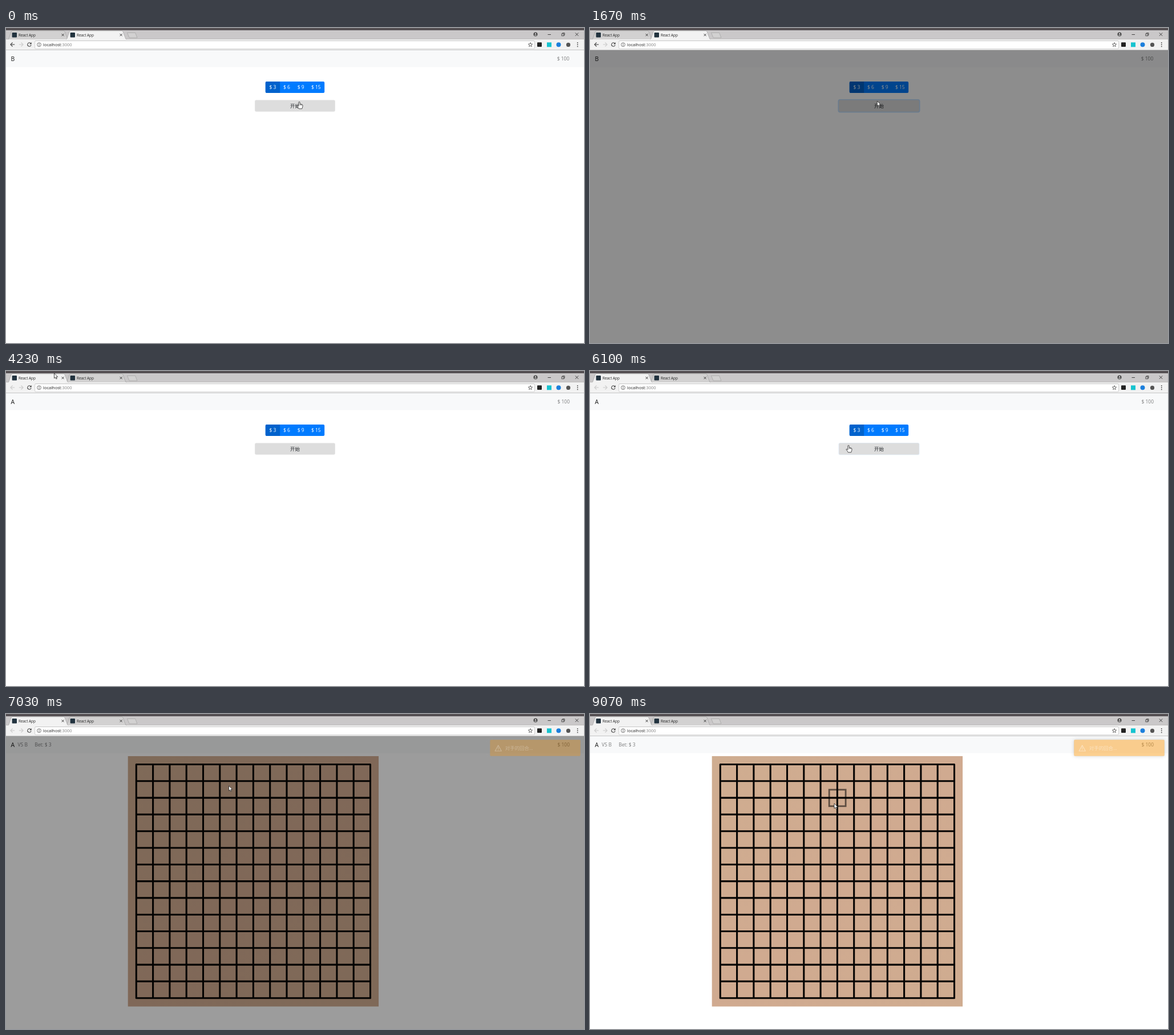
Write an HTML page with a canvas that moves like this. It is 1013 px wide and 553 px high and loops after 9.11 s.

```html
<!DOCTYPE html>
<html lang="zh">
<head>
<meta charset="utf-8">
<title>React App</title>
<style>
html, body { margin: 0; width: 100%; height: 100%; overflow: hidden; background: #fff; }
canvas { display: block; width: 1013px; height: 553px; }
</style>
</head>
<body>
<canvas id="stage"></canvas>
<script>
const W = 1013, H = 553, LOOP = 9110, REM = 8.44;
const FONT = '"Open Sans", "Noto Sans", "Noto Sans CJK SC", "Noto Sans CJK", sans-serif';
const canvas = document.getElementById('stage');
const ctx = canvas.getContext('2d');
const dpr = window.devicePixelRatio || 1;
canvas.width = Math.round(W * dpr);
canvas.height = Math.round(H * dpr);

// Moments in ms
const CLICK_B = 1465, SWITCH_TAB = 4130, CLICK_A = 6065, MATCHED = 6690;
const BACKDROP_OUT = 6997, TOAST_IN = 6904, TOAST_OUT = 8700, HOVER_FROM = 7730;

// Pointer hotspot: time, x, y
const POINTER = [
  [0, 514, 129.5], [280, 510, 123], [570, 509, 128], [1500, 509, 128], [1570, 505.5, 128.5],
  [2330, 461, 125], [2430, 458, 123], [3330, 265, 76], [4000, 88, 7], [4230, 84.5, 4],
  [4600, 84.5, 4], [4900, 285, 120], [5100, 285, 120], [5530, 453, 130.5], [6100, 453, 130.5],
  [7000, 390.5, 126], [7700, 390.5, 126], [8630, 428, 157]
];

const unit = (t, start, length) => Math.min(1, Math.max(0, (t - start) / length));
const smooth = p => p * p * (3 - 2 * p);
const swing = p => 0.5 - Math.cos(p * Math.PI) / 2;
const easeOut = p => 1 - (1 - p) ** 2;

function pointerAt(t) {
  const i = POINTER.findIndex(k => k[0] > t);
  if (i < 0) return POINTER[POINTER.length - 1].slice(1);
  const [t0, x0, y0] = POINTER[i - 1], [t1, x1, y1] = POINTER[i];
  const p = smooth((t - t0) / (t1 - t0));
  return [x0 + (x1 - x0) * p, y0 + (y1 - y0) * p];
}

function rect(x, y, w, h, fill, r = 0) {
  ctx.fillStyle = fill;
  ctx.beginPath();
  ctx.roundRect(x, y, w, h, r);
  ctx.fill();
}

function path(points, { fill, stroke, width = 1, close = false }) {
  ctx.beginPath();
  points.forEach(([x, y]) => ctx.lineTo(x, y));
  if (close) ctx.closePath();
  if (fill) { ctx.fillStyle = fill; ctx.fill(); }
  if (stroke) { ctx.strokeStyle = stroke; ctx.lineWidth = width; ctx.stroke(); }
}

function arc(x, y, r, { fill, stroke, width = 0.8, from = 0, to = Math.PI * 2 }) {
  ctx.beginPath();
  ctx.arc(x, y, r, from, to);
  if (fill) { ctx.fillStyle = fill; ctx.fill(); }
  if (stroke) { ctx.strokeStyle = stroke; ctx.lineWidth = width; ctx.stroke(); }
}

function text(s, x, cy, size, color, align = 'left', weight = 400) {
  ctx.font = `${weight} ${size}px ${FONT}`;
  ctx.textAlign = align;
  ctx.fillStyle = color;
  ctx.fillText(s, x, cy + size * 0.36);
}

function cross(x, y, r, color, width) {
  path([[x - r, y - r], [x + r, y + r]], { stroke: color, width });
  path([[x - r, y + r], [x + r, y - r]], { stroke: color, width });
}

function tab(x, active) {
  path([[x, 20], [x + 1.5, 19], [x + 6, 6], [x + 7.5, 5], [x + 98, 5], [x + 99.5, 6], [x + 104.5, 19], [x + 106, 20]],
    { fill: active ? '#f2f2f2' : '#d2d1d1', stroke: '#9b9a9a', width: 0.6 });
  rect(x + 7.3, 8, 8.4, 8.4, '#22333f', 1);
  text('React App', x + 18.7, 12.2, 6.4, '#222');
  cross(x + 96.3, 12.2, 2, '#333', 1);
}

function backArrow(x, dir, color) {
  path([[x + 3.7 * dir, 29], [x - 3.5 * dir, 29]], { stroke: color, width: 1.1 });
  path([[x, 25.5], [x - 3.6 * dir, 29], [x, 32.5]], { stroke: color, width: 1.1 });
}

function browser(onB) {
  rect(0, 0, W, 4, '#555053');
  rect(0, 4, W, 16, '#cac8c9');
  rect(0, 19.7, W, 19, '#f2f2f2');
  rect(0, 19.5, W, 0.5, '#a9a8a8');
  rect(0, 38.2, W, 0.8, '#b6b6b6');
  path([[212.5, 8.3], [226.5, 8.3], [230, 17], [216, 17]], { fill: '#d2d1d1', stroke: '#9b9a9a', width: 0.6, close: true });
  if (onB) { tab(3.3, false); tab(105.3, true); }
  else { tab(105.3, false); tab(3.3, true); }

  // Window controls
  arc(928, 11, 3.5, { fill: '#444' });
  arc(928, 10, 1.3, { fill: '#cac8c9' });
  rect(926, 12, 4, 1.2, '#cac8c9', 0.6);
  rect(949.5, 11, 5.5, 0.9, '#333');
  ctx.strokeStyle = '#333';
  ctx.lineWidth = 0.8;
  ctx.strokeRect(974, 10, 3.8, 3.8);
  path([[975.4, 10], [975.4, 8.7], [979, 8.7], [979, 12.4], [977.8, 12.4]], { stroke: '#333', width: 0.8 });
  cross(1000.5, 11.2, 2.7, '#333', 0.9);

  // Toolbar
  backArrow(11.5, 1, onB ? '#444' : '#ccc');
  backArrow(26.5, -1, '#ccc');
  arc(41, 29, 3.2, { stroke: '#444', width: 1.1, from: 0.3, to: 5.4 });
  path([[44.7, 25], [44.7, 28.6], [41.2, 28.6]], { fill: '#444' });
  rect(50.5, 22.3, 876, 14.2, '#b9b9b9', 1.5);
  rect(51.1, 22.9, 874.8, 13, '#fff', 1);
  arc(58, 29.2, 3.4, { stroke: '#555' });
  rect(57.6, 28.6, 0.9, 2.6, '#555');
  rect(57.6, 27, 0.9, 0.9, '#555');
  text('localhost', 65, 29, 7.5, '#222');
  const hostWidth = ctx.measureText('localhost').width;
  text(':3000', 65 + hostWidth, 29, 7.5, '#808080');
  const star = Array.from({ length: 10 }, (_, i) => {
    const a = i * Math.PI / 5 - Math.PI / 2, r = i % 2 ? 1.7 : 3.9;
    return [919 + r * Math.cos(a), 29.4 + r * Math.sin(a)];
  });
  path(star, { stroke: '#444', width: 0.8, close: true });
  rect(931, 25.3, 8, 7.8, '#222', 1);
  rect(948, 25.3, 8, 8, '#16c3cf');
  arc(968.5, 29.2, 4, { fill: '#1c7fdc' });
  arc(985.5, 29.4, 3.6, { fill: '#555' });
  [26, 29.2, 32.4].forEach(y => arc(1001.7, y, 0.9, { fill: '#444' }));
}

function navbar(onB, playing) {
  rect(0, 39, W, 29.7, '#f8f9fa');
  text(onB ? 'B' : 'A', 8.4, 54.3, 10.4, 'rgba(0,0,0,.9)');
  text('$ 100', onB ? 987.2 : 988, 54.3, REM, 'rgba(0,0,0,.5)', 'right');
  if (playing) {
    text('VS B', 20.6, 54.3, REM, 'rgba(0,0,0,.5)');
    text('Bet: $ 3', 50.2, 54.3, REM, 'rgba(0,0,0,.5)');
  }
}

function lobby(focus) {
  rect(454.8, 94, 103.4, 20, '#007bff', 2.1);
  rect(454.8, 94, 25.4, 20, '#0062cc', [2.1, 0, 0, 2.1]);
  [['$ 3', 467.3], ['$ 6', 492], ['$ 9', 516.6], ['$ 15', 543.2]]
    .forEach(([label, x]) => text(label, x, 104.3, REM, '#fff', 'center'));
  if (focus > 0) {
    const g = 1.7 * focus;
    rect(436.2 - g, 126.6 - g, 140.6 + 2 * g, 20.2 + 2 * g, `rgba(0,123,255,${0.25 * focus})`, 2.1 + g);
  }
  rect(436.2, 126.6, 140.6, 20.2, '#ddd', 2.1);
  text('开始', 506.5, 136.7, REM, '#212529', 'center');
}

function board(hover) {
  const x0 = 228.3, y0 = 88.5, step = 29.3, size = step * 14;
  const wood = ctx.createLinearGradient(214, 74, 653, 513);
  wood.addColorStop(0, '#cfad90');
  wood.addColorStop(0.5, '#d0aa90');
  wood.addColorStop(1, '#cfac90');
  rect(213.7, 74, 439.4, 439.5, wood);
  ctx.strokeStyle = '#050302';
  ctx.lineWidth = 3.1;
  ctx.lineCap = 'round';
  ctx.beginPath();
  for (let i = 0; i < 15; i++) {
    const d = i * step;
    ctx.moveTo(x0 + d, y0);
    ctx.lineTo(x0 + d, y0 + size);
    ctx.moveTo(x0, y0 + d);
    ctx.lineTo(x0 + size, y0 + d);
  }
  ctx.stroke();
  ctx.lineCap = 'butt';
  if (hover) {
    const cx = x0 + Math.round((hover[0] - x0) / step) * step;
    const cy = y0 + Math.round((hover[1] - y0) / step) * step;
    ctx.strokeStyle = 'rgba(0,0,0,.55)';
    ctx.lineWidth = 2.8;
    ctx.strokeRect(cx - 14.2, cy - 14.2, 28.9, 28.9);
  }
}

function modal(t, opacity, dy) {
  if (opacity <= 0) return;
  ctx.save();
  ctx.globalAlpha = opacity;
  ctx.translate(0, dy);
  rect(374.8, 54.1, 263.4, 96.6, '#fff', 2.6);
  text('正在寻找对手', 383.7, 71, 10.55, '#212529');
  cross(624.9, 70.8, 2.4, '#7f7f7f', 1.5);
  rect(375, 87, 263, 0.6, '#e9ecef');
  rect(375, 113, 263, 0.6, '#e9ecef');
  rect(598.8, 122, 30.7, 20, '#6c757d', 2.1);
  text('关闭', 614.2, 132, REM, '#fff', 'center');

  rect(383.7, 96, 245.8, REM, '#007bff', 2.1);
  ctx.clip();
  const shift = REM * (1 - t / 1000 % 1);
  for (let x = 383.7 - 2 * REM + shift; x < 640; x += REM) {
    path([[x, 96], [x + REM / 2, 96], [x + REM * 1.5, 96 + REM], [x + REM, 96 + REM]],
      { fill: 'rgba(255,255,255,.15)' });
  }
  ctx.restore();
}

function toast(opacity) {
  if (opacity <= 0) return;
  ctx.save();
  ctx.globalAlpha = opacity;
  ctx.save();
  ctx.beginPath();
  ctx.rect(0, 0, W, H);
  ctx.roundRect(848.3, 45.3, 158.4, 28.4, 1.6);
  ctx.clip('evenodd');
  ctx.shadowColor = '#999';
  ctx.shadowBlur = 6.3 * dpr;
  rect(848.3, 45.3, 158.4, 28.4, '#999', 1.6);
  ctx.restore();
  rect(848.3, 45.3, 158.4, 28.4, '#f89406', 1.6);
  ctx.lineJoin = 'round';
  path([[862.7, 55], [868.3, 65], [857.1, 65]], { stroke: '#fff', width: 1.1, close: true });
  rect(862.2, 58.2, 1.1, 3.3, '#fff');
  rect(862.2, 62.3, 1.1, 1.1, '#fff');
  text('对手的回合...', 874.8, 60, REM, '#fff');
  ctx.restore();
}

function pointer([x, y], hand) {
  ctx.save();
  ctx.translate(x, y);
  ctx.lineJoin = 'round';
  if (hand) {
    path([[-1.1, 0.7], [0, 0], [1.1, 0.7], [1.1, 4], [3.2, 4.3], [5.2, 5], [6, 6], [5.8, 9], [4.7, 12.3],
      [-0.7, 12.3], [-2, 10], [-4, 7.5], [-3.5, 6.5], [-2.3, 6.8], [-1.1, 8]],
      { fill: '#fff', stroke: '#222', width: 0.8, close: true });
    [1.1, 2.8, 4.4].forEach(fx => path([[fx, 4.4], [fx, 6.4]], { stroke: '#222', width: 0.6 }));
  } else {
    path([[0, 0], [0, 8.8], [2, 7], [3.4, 10], [4.8, 9.4], [3.5, 6.4], [6.2, 6.3]],
      { fill: '#fff', stroke: '#222', width: 0.8, close: true });
  }
  ctx.restore();
}

function draw(t) {
  const onB = t < SWITCH_TAB, playing = t >= MATCHED;
  const click = onB ? CLICK_B : CLICK_A;
  const pos = pointerAt(t);
  ctx.setTransform(dpr, 0, 0, dpr, 0, 0);
  rect(0, 0, W, H, '#fff');
  navbar(onB, playing);
  if (playing) board(t >= HOVER_FROM && pos);
  else lobby(easeOut(unit(t, click, 150)));

  const shade = 0.5 * (unit(t, click + 72, 150) - unit(t, BACKDROP_OUT, 150));
  if (shade > 0) rect(0, 39, W, H - 39, `rgba(0,0,0,${shade})`);
  const opened = click + 222;
  modal(t, unit(t, opened, 150) - unit(t, MATCHED, 150),
    -24 * (1 - easeOut(unit(t, opened, 300)) + easeOut(unit(t, MATCHED, 300))));
  toast(0.8 * (swing(unit(t, TOAST_IN, 300)) - swing(unit(t, TOAST_OUT, 800))));
  browser(onB);

  const overButton = pos[0] > 436 && pos[0] < 577 && pos[1] > 120 && pos[1] < 147;
  pointer(pos, overButton && t < click + 72);
}

const start = performance.now();
function tick() {
  draw((performance.now() - start) % LOOP);
  requestAnimationFrame(tick);
}
tick();
</script>
</body>
</html>
```
